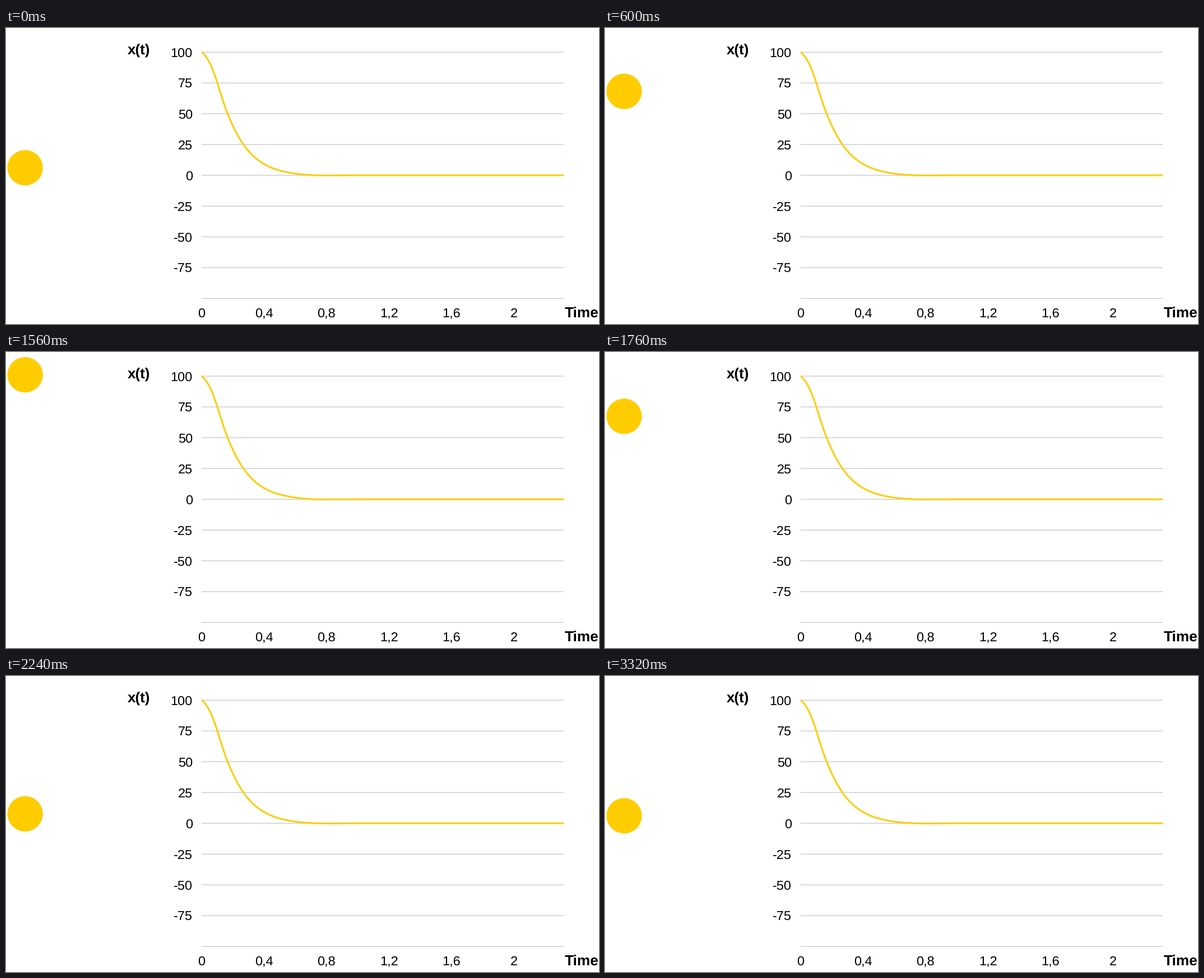
Recreate the animation shown at these times as a matplotlib script. Size 1058 by 529 pixels, loop 3400 ms.

```python
import math

import matplotlib.pyplot as plt
from matplotlib.animation import FuncAnimation
from matplotlib.patches import Circle, PathPatch
from matplotlib.path import Path

WIDTH, HEIGHT, DPI = 1058, 529, 100
STEP_MS, FRAMES = 40, 85
YELLOW, GREY = "#ffcc00", "#b7b7b7"

LEFT, RIGHT, TOP, ROW = 349, 995, 43.1, 55.03
BALL_X, REST_Y, RAISED_Y = 34.1, 249.8, 40.7

plt.rcParams["font.family"] = "Liberation Sans"
plt.rcParams["text.hinting"] = "none"


def px(size):
    return size * 72 / DPI


def decay(u, order):
    """Step response of equal lag stages, falling from 1 to 0."""
    u = max(u, 0)
    return math.exp(-u) * sum(u**k / math.factorial(k) for k in range(order))


def ball_y(ms):
    if ms < 1400:
        lifted = 1 - decay(0.0378 * (ms - 367), 8)
    else:
        lifted = decay(0.0117 * (ms - 1579), 3)
    return REST_Y + (RAISED_Y - REST_Y) * lifted


fig = plt.figure(figsize=(WIDTH / DPI, HEIGHT / DPI), dpi=DPI, facecolor="white")
ax = fig.add_axes([0, 0, 1, 1])
ax.set_xlim(0, WIDTH)
ax.set_ylim(HEIGHT, 0)
ax.axis("off")


def label(x, baseline, text, size=23.5, **style):
    ax.text(x, baseline, text, fontsize=px(size), color="black",
            va="baseline", **style)


for i in range(9):
    y = TOP + ROW * i
    ax.plot([LEFT, RIGHT], [y, y], color=GREY, lw=px(1),
            solid_capstyle="butt", snap=False)
    if i < 8:
        label(332.8, y + 8.3, str(100 - 25 * i), ha="right")

for i, text in enumerate(["0", "0,4", "0,8", "1,2", "1,6", "2"]):
    label(349 + 111.4 * i, 516.6, text, ha="center")

label(216.5, 48.1, "x(t)", 26, weight="bold")
label(997, 517.6, "Time", 26.3, weight="bold")

# Smooth decay: a start point, then Bezier pieces (two handles and an end)
curve = [
    (LEFT, TOP),
    (359, 50), (368.3, 70), (377, 98),
    (381.5, 112.5), (389.5, 138.5), (395.3, 153),
    (404.7, 176.5), (414.1, 194.4), (423.5, 208),
    (435.7, 225.7), (448, 235.9), (460.2, 243),
    (478.8, 253.8), (497.4, 257.4), (516, 260.2),
    (534.6, 263), (553.3, 263.5), (572, 263.5),
    (590, 263.5), (609, 263.2), (627, 263.2),
    (RIGHT, 263.2),
]
codes = [Path.MOVETO] + [Path.CURVE4] * (len(curve) - 2) + [Path.LINETO]
ax.add_patch(PathPatch(Path(curve, codes), fc="none", ec=YELLOW, lw=px(3),
                       capstyle="butt", joinstyle="round", zorder=3))

ball = ax.add_patch(Circle((BALL_X, REST_Y), 31.6, fc=YELLOW, ec="none"))


def update(frame):
    ball.center = BALL_X, ball_y(frame * STEP_MS)
    return (ball,)


anim = FuncAnimation(fig, update, frames=FRAMES, interval=STEP_MS,
                     repeat=True, repeat_delay=0, blit=False)
plt.show()
```
